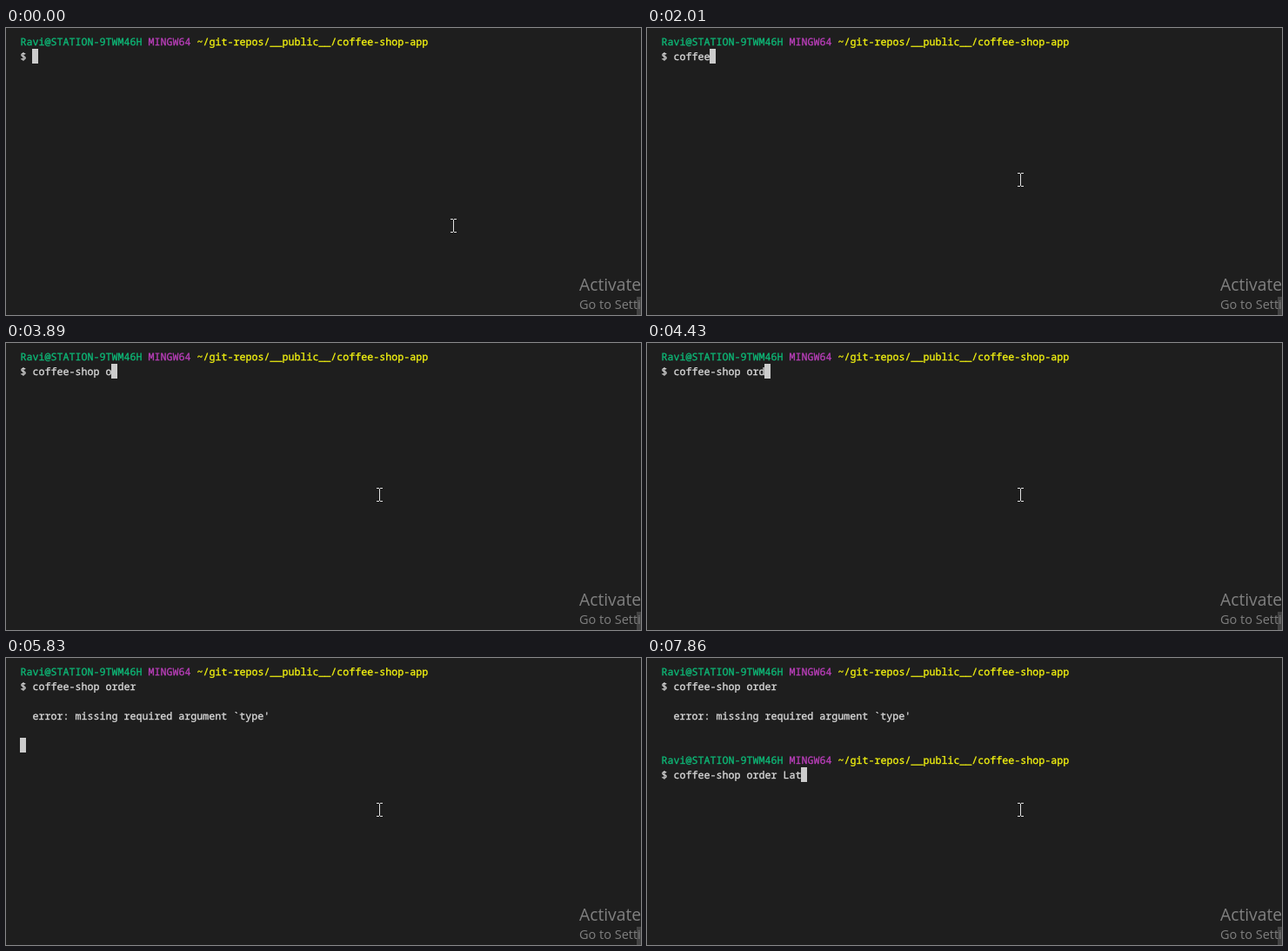
Write an HTML page that moves like this. It is 730 px wide and 331 px high and loops after 8 s.

```html
<!DOCTYPE html>
<html lang="en">
<head>
<meta charset="utf-8">
<title>Terminal session</title>
<style>
  html, body { margin: 0; width: 100%; height: 100%; overflow: hidden; background: #1e1e1e; }
  svg { display: block; width: 730px; height: 331px; }
  text { white-space: pre; }
  .term { font: 11.667px "Noto Sans Mono", "DejaVu Sans Mono", monospace; text-rendering: geometricPrecision; color: #dcdcdc; }
  .term text { fill: currentColor; stroke: currentColor; stroke-width: .3px; }
  .note { font-family: "Open Sans", "Noto Sans", sans-serif; fill: #808080; }
  .user { color: #0dbc79; }
  .shell { color: #bc3fbc; }
  .path { color: #f5f510; }
</style>
</head>
<body>
<svg viewBox="0 0 730 331">
  <rect width="730" height="331" fill="#1e1e1e"/>
  <rect x="725" y="310" width="5" height="21" fill="#434343"/>
  <g class="note">
    <text x="659" y="303" font-size="19.3">Activate</text>
    <text x="659" y="324" font-size="14.5">Go to Setti</text>
  </g>
  <g id="screen" class="term" transform="translate(.5 0)"></g>
  <rect id="caret" width="7" height="17" fill="#cccccc"/>
  <path id="pointer" d="M-3 .5H0M1 .5H4M.5 1V15M-3 15.5H0M1 15.5H4" fill="none" stroke="#e1e1e1" shape-rendering="crispEdges"/>
</svg>
<script>
const LOOP = 8000, LEFT = 16, CELL = 7, ROW = 17, TOP = 7;
const NS = "http://www.w3.org/2000/svg";
const byId = id => document.getElementById(id);
const screen = byId("screen"), caret = byId("caret"), pointer = byId("pointer");

// [time, text typed so far]
const firstInput = [
  [0, ""], [620, "c"], [850, "co"], [1170, "cof"], [1320, "coff"], [1400, "coffe"],
  [2010, "coffee"], [2260, "coffee-"], [2410, "coffee-sh"], [2720, "coffee-shop"],
  [2880, "coffee-shop "], [3890, "coffee-shop o"], [4200, "coffee-shop or"],
  [4430, "coffee-shop ord"], [4580, "coffee-shop orde"], [4750, "coffee-shop order"]
];
const secondInput = [
  [6150, ""], [6700, "coffee-shop order"], [7310, "coffee-shop order "],
  [7540, "coffee-shop order L"], [7710, "coffee-shop order La"], [7860, "coffee-shop order Lat"]
];
const ENTER = 4900, ERROR = 5830, PROMPT = 6150;
const pointerStops = [[0, [514, 220]], [70, [466, 190]], [160, [429, 167]]];

function valueAt(steps, t) {
  let value = steps[0][1];
  for (const [start, next] of steps) if (t >= start) value = next;
  return value;
}

function addText(row, col, string, style = "") {
  const node = document.createElementNS(NS, "text");
  node.setAttribute("x", LEFT + col * CELL);
  node.setAttribute("y", 20 + row * ROW);
  node.setAttribute("class", style);
  node.textContent = string;
  screen.appendChild(node);
  return node;
}

function addPrompt(row) {
  return [
    addText(row, 0, "Ravi@STATION-9TWM46H", "user"),
    addText(row, 21, "MINGW64", "shell"),
    addText(row, 29, "~/git-repos/__public__/coffee-shop-app", "path"),
    addText(row + 1, 0, "$")
  ];
}

addPrompt(0);
const firstLine = addText(1, 2, "");
const errorLine = addText(3, 2, "error: missing required argument `type'");
const nextPrompt = addPrompt(6);
const secondLine = addText(7, 2, "");

function show(node, on) {
  node.setAttribute("visibility", on ? "visible" : "hidden");
}

function caretCell(t, first, second) {
  if (t < ENTER) return [1, 2 + first.length];
  if (t < ERROR) return [2, 0];
  if (t < PROMPT) return [5, 0];
  return [7, 2 + second.length];
}

function draw(t) {
  const first = valueAt(firstInput, t);
  const second = valueAt(secondInput, t);
  firstLine.textContent = first;
  secondLine.textContent = second;
  show(errorLine, t >= ERROR);
  for (const node of [...nextPrompt, secondLine]) show(node, t >= PROMPT);

  const [row, col] = caretCell(t, first, second);
  caret.setAttribute("x", LEFT + col * CELL);
  caret.setAttribute("y", TOP + row * ROW);
  pointer.setAttribute("transform", `translate(${valueAt(pointerStops, t)})`);
}

const began = performance.now();
function tick() {
  draw((performance.now() - began) % LOOP);
  requestAnimationFrame(tick);
}
tick();
</script>
</body>
</html>
```
